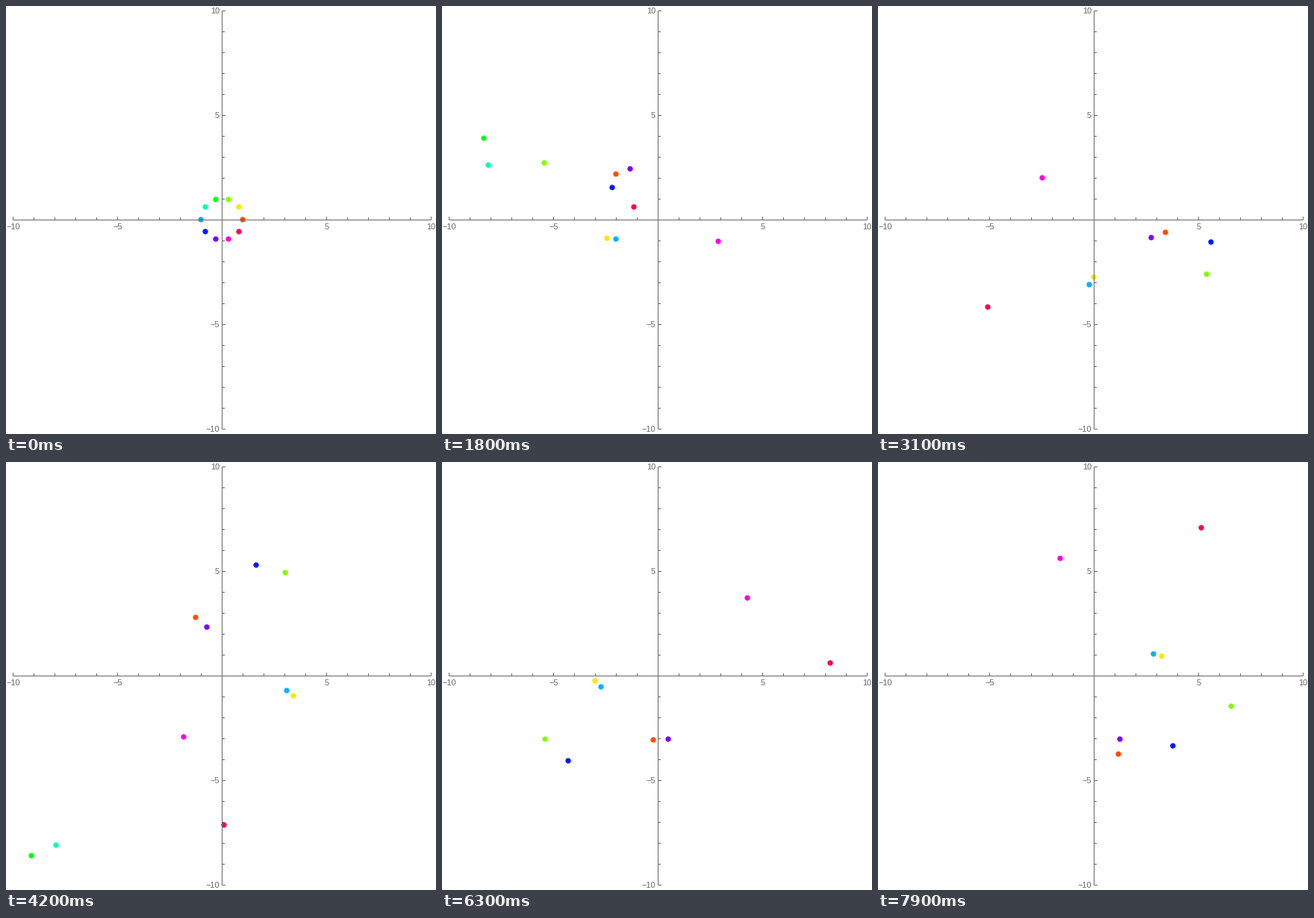
These frames come from a looping animation (576 px wide and 573 px high, 8 s). A matplotlib script:

```python
import colorsys

import matplotlib.pyplot as plt
import numpy as np
from matplotlib.animation import FuncAnimation
from matplotlib.patches import Rectangle

W, H, DPI = 576, 573, 64
PT = 72 / DPI            # points per pixel
FRAMES, STEP = 80, 100
OX, OY, UNIT = 289.5, 286.5, 28
INK = "#666666"
TIMES = np.array([18, 31, 42, 52, 63, 79])
SPREAD = TIMES[0]        # dots spiral out from the unit circle until here

# dots, (separation, phase, degrees per frame), key poses in plot units
ORBITS = [
    ((0, 7), (0.71, 242.4, 207.6),
     [-1.68+2.30j, 3.06-0.74j, -1.00+2.55j, -3.59-0.78j, 0.13-3.06j, 1.20-3.40j]),
    ((1, 5), (0.41, 157, -9),
     [-2.23-0.92j, -0.12-2.94j, 3.25-0.85j, 0.89+2.01j, -2.87-0.40j, 3.04+0.98j]),
    ((3, 4), (1.3, -161, 4.4),
     [-8.23+3.26j, -12.5-3j, -8.53-8.36j, -4.5-13j]),
    ((2,), None,
     [-5.45+2.71j, 5.38-2.61j, 3.02+4.92j, -3.55+4.49j, -5.41-3.04j, 6.56-1.47j]),
    ((6,), None,
     [-2.19+1.53j, 5.59-1.08j, 1.63+5.28j, -4.09+3.21j, -4.30-4.08j, 3.77-3.36j]),
    ((8,), None,
     [2.88-1.04j, -2.48+1.99j, -1.84-2.94j, 3.91-1.79j, 4.27+3.71j, -1.62+5.60j]),
    ((9,), None,
     [-1.16+0.60j, -5.09-4.19j, 0.09-7.15j, 5.70-4.58j, 8.23+0.60j, 5.13+7.06j]),
]


def hermite(t, v, n):
    m = np.gradient(v, t)
    n = np.clip(n, t[0], t[-1])
    i = np.clip(np.searchsorted(t, n, side="right") - 1, 0, len(t) - 2)
    h = t[i + 1] - t[i]
    u = (n - t[i]) / h
    return ((1 + 2 * u) * (1 - u) ** 2 * v[i] + u * (1 - u) ** 2 * h * m[i]
            + u * u * (3 - 2 * u) * v[i + 1] - u * u * (1 - u) * h * m[i + 1])


def spiral(t, poses, n):
    """Smooth anticlockwise path around the origin through the poses."""
    poses = np.asarray(poses)
    angle = np.angle(poses)
    turns = np.cumsum(np.diff(angle) % (2 * np.pi))
    angle = angle[0] + np.concatenate([[0], turns])
    return hermite(t, np.abs(poses), n) * np.exp(1j * hermite(t, angle, n))


def all_paths():
    n = np.arange(FRAMES)
    paths = np.zeros((10, FRAMES), complex)
    for dots, spin, poses in ORBITS:
        center = spiral(TIMES[:len(poses)], poses, n)
        arm = 0
        if spin:
            gap, phase, rate = spin
            arm = gap / 2 * np.exp(1j * np.radians(phase + rate * n))
        for k, side in zip(dots, (-1, 1)):
            z = center + side * arm
            start = np.exp(1j * np.pi * k / 5)
            z[:SPREAD] = spiral(np.array([0, SPREAD]), [start, z[SPREAD]], n[:SPREAD])
            paths[k] = z
    return paths


# Dots sit on whole pixels, slightly up and left of the axis crossing.
paths = all_paths()
pixels = np.rint(np.stack([OX - 0.05 + UNIT * paths.real,
                           OY - 0.7 - UNIT * paths.imag], axis=-1))
colors = [colorsys.hsv_to_rgb(0.05 + k / 10, 1, 1) for k in range(10)]

fig = plt.figure(figsize=(W / DPI, H / DPI), dpi=DPI, facecolor="white")
ax = fig.add_axes([0, 0, 1, 1])
ax.set_xlim(0, W)
ax.set_ylim(H, 0)
ax.axis("off")

dots = ax.scatter(pixels[:, 0, 0], pixels[:, 0, 1], s=(7.3 * PT) ** 2,
                  c=colors, linewidths=0, zorder=2)
half = 10 * UNIT
dots.set_clip_path(Rectangle((OX - half - 0.5, OY - half - 0.5),
                             2 * half + 1, 2 * half + 1, transform=ax.transData))


def line(x0, y0, x1, y1):
    ax.plot([x0, x1], [y0, y1], color=INK, lw=PT, snap=False,
            solid_capstyle="butt", zorder=3)


def label(x, y, v, ha):
    ax.text(x, y, str(v).replace("-", "\u2212"), ha=ha, va="baseline",
            family="Liberation Sans", size=11 * PT, color=INK, zorder=3)


line(OX - half, OY, OX + half, OY)
line(OX, OY - half, OX, OY + half)
for v in range(-10, 11):
    size = 4.5 if v % 5 == 0 else 3.5
    x, y = OX + v * UNIT, OY - v * UNIT
    line(x, OY, x, OY - size)
    line(OX, y, OX + size, y)
    if v and v % 5 == 0:
        label(x, OY + 12.5, v, "center")
        label(OX - 3.5, y + 3.5, v, "right")


def update(n):
    dots.set_offsets(pixels[:, n])
    return (dots,)


anim = FuncAnimation(fig, update, frames=FRAMES, interval=STEP,
                     repeat=True, repeat_delay=0, blit=False)
plt.show()
```
